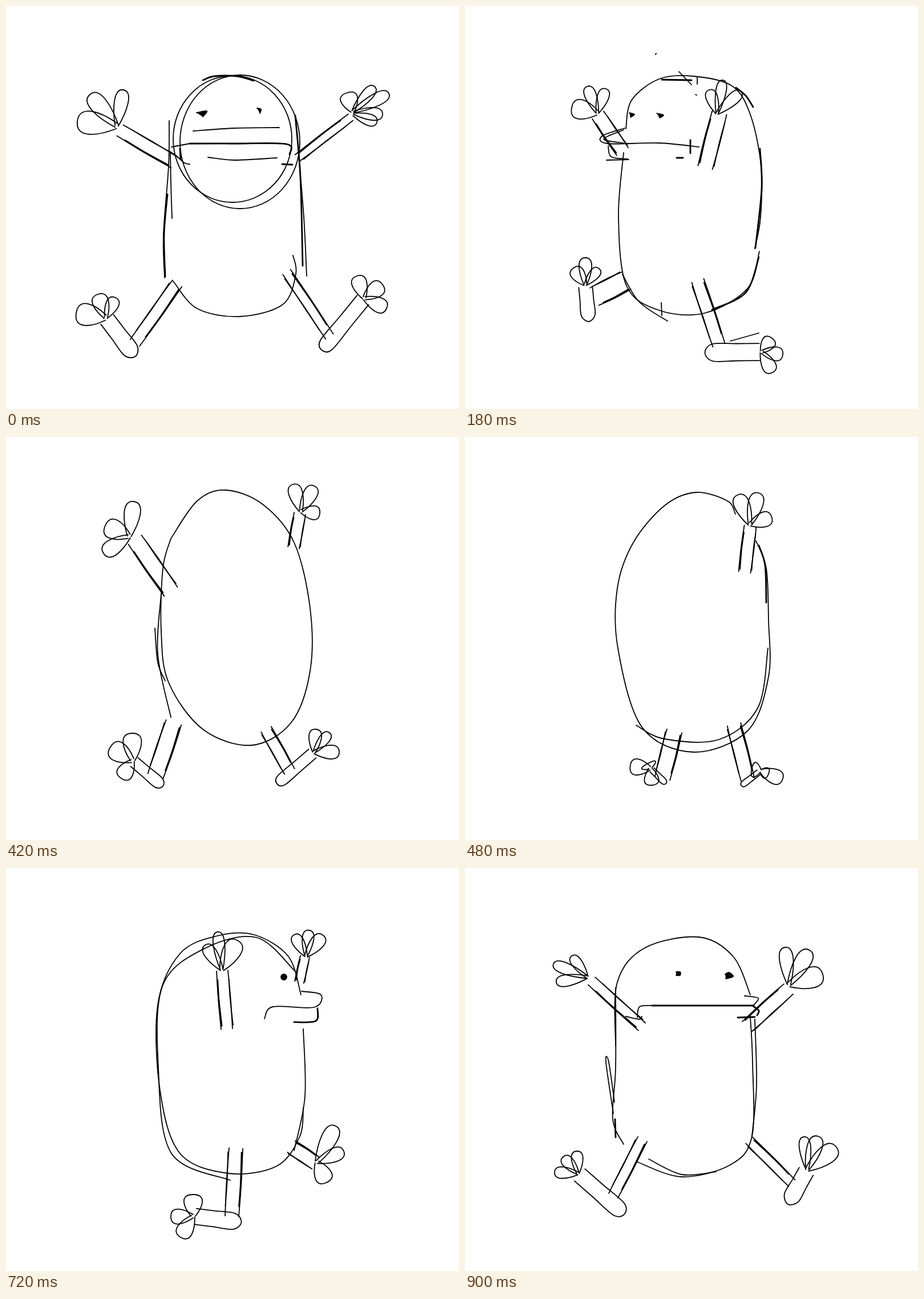
An HTML page with a canvas that plays this animation: 794x706 px, repeating every 0.96 s.

```html
<!DOCTYPE html>
<html lang="en">
<head>
<meta charset="utf-8">
<title>Turning doodle</title>
<style>
html, body { margin: 0; width: 100%; height: 100%; overflow: hidden; background: #fff; }
canvas { display: block; }
</style>
</head>
<body>
<canvas id="stage" width="794" height="706"></canvas>
<script>
const ctx = document.getElementById('stage').getContext('2d');
ctx.lineCap = ctx.lineJoin = 'round';

function pen(kind) {
  ctx.lineWidth = kind === '*' ? 2.8 : 1.8;
  if (kind === '#') ctx.fill();
  ctx.stroke();
}

function smooth(pts) {
  ctx.beginPath();
  ctx.moveTo(...pts[0]);
  for (let i = 0; i < pts.length - 1; i++) {
    const b = pts[i], c = pts[i + 1], a = pts[i - 1] || b, d = pts[i + 2] || c;
    ctx.bezierCurveTo(b[0] + (c[0] - a[0]) / 6, b[1] + (c[1] - a[1]) / 6,
      c[0] - (d[0] - b[0]) / 6, c[1] - (d[1] - b[1]) / 6, c[0], c[1]);
  }
}

// A stroke runs through its points; prefix * is heavy, # is filled.
function stroke(text) {
  const kind = '*#'.includes(text[0]) ? text[0] : '';
  smooth(text.slice(kind.length).split(' ').map(p => p.split(',').map(Number)));
  pen(kind);
}

function ring(x, y, rx, ry) {
  ctx.beginPath();
  ctx.ellipse(x, y, rx, ry, 0, 0, 2 * Math.PI);
  pen();
}

// Gives points by distance along and beside the line from a to b.
function rail(ax, ay, bx, by) {
  const len = Math.hypot(bx - ax, by - ay) || 1;
  const ux = (bx - ax) / len, uy = (by - ay) / len;
  return { len, at: (along, side) => [ax + ux * along - uy * side, ay + uy * along + ux * side] };
}

function digit(x, y, tx, ty, w) {
  const { len, at } = rail(x, y, tx, ty);
  const tip = at(len, 0);
  ctx.beginPath();
  ctx.moveTo(...at(0, -w * 0.12));
  ctx.bezierCurveTo(...at(len * 0.4, -w * 0.5), ...at(len, -w * 0.8), ...tip);
  ctx.bezierCurveTo(...at(len, w * 0.8), ...at(len * 0.4, w * 0.5), ...at(0, w * 0.12));
  pen();
}

function sole(x, y, hx, hy, w) {
  const { len, at } = rail(x, y, hx, hy), r = w / 2;
  smooth([at(4, -r), at(len * 0.5, -r), at(len, -r), at(len + r * 0.9, 0), at(len, r), at(len * 0.5, r), at(4, r)]);
  pen();
}

// Two sketchy edges, each a thin line with a heavier second pass.
function bone(ax, ay, bx, by, w) {
  const { len, at } = rail(ax, ay, bx, by);
  for (const side of [-w / 2, w / 2]) {
    smooth([at(0, side), at(len * 0.5, side * 1.08), at(len, side)]);
    pen();
    smooth([at(len * 0.06, side + 1.5), at(len * 0.5, side), at(len * 0.85, side + 0.5)]);
    pen(side < 0 ? '*' : '');
  }
}

// bone: root, joint, width; base: where the digits meet; digits: tip and width each; heel: end and width
function limb(bone, base, digits, heel = [bone[2], bone[3], 0]) {
  return [...bone, ...base, ...heel, ...digits.flat()];
}

function drawLimb(n) {
  const [x, y] = n.slice(5, 7);
  bone(...n.slice(0, 5));
  if (n[9] > 8) sole(x, y, ...n.slice(7, 10));
  for (let i = 10; i < n.length; i += 3) digit(x, y, ...n.slice(i, i + 3));
}

const front = {
  body() {
    ring(410, 238, 105, 117);
    ring(397, 233, 104, 111);
    stroke('*345,130 365,123 405,123 434,131');
    stroke('286,201 285,280 276,400 278,476');
    stroke('*283,330 277,400 279,474');
    stroke('288,255 289,310 291,372');
    stroke('*507,192 516,300 520,455');
    stroke('512,250 522,370 527,473');
    stroke('293,482 335,530 410,544 485,523 508,470 503,437');
  },
  faceX: 400,
  face() {
    stroke('#334,187 352,184 345,194');
    stroke('#440,179 447,181 445,188');
    stroke('328,219 400,214 479,213');
    stroke('*322,241 400,241 492,242 497,260');
    stroke('290,247 322,241');
    stroke('*305,250 306,268');
    stroke('298,262 313,275 322,277');
    stroke('354,265 400,270 475,266');
    stroke('*484,277 502,278');
  },
  marks() {
    digit(609, 187, 660, 190, 22);
    digit(609, 190, 650, 204, 20);
  },
  armL: limb([295, 274, 200, 218, 22], [194, 210], [[125, 202, 40], [147, 155, 30], [206, 147, 24]]),
  armR: limb([511, 266, 604, 195, 14], [608, 185], [[598, 152, 30], [646, 141, 20], [671, 153, 22]]),
  legL: limb([300, 486, 226, 590, 20], [175, 546], [[123, 538, 38], [161, 505, 28], [192, 511, 22]], [219, 604, 28]),
  legR: limb([492, 466, 567, 579, 16], [628, 512], [[615, 473, 26], [660, 488, 28], [667, 530, 26]], [561, 594, 26])
};

const left34 = {
  body() {
    stroke('282,215 292,165 340,128 400,123 468,140 500,190 519,280 518,370 508,425');
    stroke('*475,143 492,157 505,177');
    stroke('*517,250 520,320 509,424');
    stroke('278,257 269,370 283,490 340,533 420,538 495,495 516,430');
    stroke('*515,440 492,502 433,532');
    stroke('276,470 305,518 355,552');
    stroke('*345,129 397,130');
  },
  faceX: 320,
  face() {
    stroke('#288,187 297,190 290,195');
    stroke('#336,188 348,191 341,196');
    stroke('280,214 240,228 250,241 340,240 410,247');
    stroke('*395,235 395,258');
    stroke('*371,266 382,266');
    stroke('278,217 243,233 277,240');
    stroke('251,245 256,264 285,268');
    stroke('248,270 287,269');
  },
  marks() {
    stroke('375,115 397,138');
    stroke('407,124 407,137');
    stroke('344,520 345,542');
    stroke('465,587 515,573');
    stroke('404,155 406,156');
    stroke('334,85 335,83');
  },
  armL: limb([276, 255, 233, 191, 24], [232, 187], [[187, 178, 34], [214, 141, 20], [247, 145, 20]]),
  armR: limb([421, 283, 446, 187, 26], [442, 188], [[428, 147, 20], [452, 130, 18], [484, 150, 20]]),
  legL: limb([283, 481, 227, 509, 34], [211, 488], [[190, 459, 24], [211, 441, 22], [235, 460, 18]], [216, 542, 24]),
  legR: limb([408, 481, 445, 594, 22], [520, 606], [[538, 582, 24], [557, 611, 24], [539, 642, 24]], [434, 607, 30])
};

const left = {
  body() {
    stroke('272,345 282,210 315,122 380,107 465,130 515,220 526,350 516,445 465,520 375,543 285,488 263,420 267,335');
    stroke('270,340 285,455 340,520 409,539');
    stroke('*306,145 278,250 275,360');
    stroke('*294,170 276,290 284,347');
  },
  faceX: 265,
  face() {
    stroke('278,208 243,217 244,237 300,243 316,258');
    stroke('246,241 256,257 275,257');
    stroke('*268,244 305,243');
  },
  armL: limb([303, 162, 306, 122, 20], [302, 120], [[288, 83, 32], [322, 84, 26]]),
  armR: limb([374, 278, 373, 170, 24], [368, 168], [[334, 123, 36], [371, 90, 28], [396, 123, 28]]),
  legR: limb([357, 490, 356, 602, 30], [354, 622], [[331, 659, 20], [358, 664, 24], [393, 646, 20]])
};

const back = {
  body() {
    stroke('289,178 335,112 385,93 450,118 505,185 533,300 533,410 500,500 430,540 345,512 285,430 272,340 275,230 289,178');
    stroke('272,275 266,380 289,491');
    stroke('261,335 266,395 279,427');
  },
  armL: limb([504, 194, 515, 134, 20], [517, 130], [[503, 83, 24], [541, 86, 24], [550, 134, 24]]),
  armR: limb([289, 271, 226, 180, 28], [216, 174], [[174, 155, 34], [224, 113, 28], [171, 204, 28]]),
  legL: limb([456, 512, 497, 586, 20], [540, 552], [[543, 512, 22], [567, 518, 18], [584, 552, 24]], [482, 602, 20]),
  legR: limb([294, 500, 262, 594, 28], [222, 567], [[183, 543, 34], [221, 519, 32], [202, 598, 28]], [268, 606, 20])
};

const backRight = {
  body() {
    stroke('474,135 460,112 405,97 350,120 295,185 267,265 268,370 310,508 400,552 495,515 532,420 532,320 528,230 510,182');
    stroke('300,505 350,529 445,530 513,475 531,370');
    stroke('*515,190 526,225 528,290');
  },
  marks() {
    stroke('532,466 529,481');
    stroke('*497,184 515,179');
  },
  armL: limb([476, 280, 485, 178, 22], [482, 176], [[453, 120, 30], [488, 110, 28], [525, 146, 28]]),
  legL: limb([487, 495, 494, 614, 28], [496, 618], [[462, 652, 30], [497, 663, 20], [529, 648, 28]]),
  legR: limb([440, 530, 430, 602, 26], [428, 594], [[396, 611, 22], [420, 625, 22], [454, 622, 22]])
};

const right = {
  body() {
    stroke('517,222 495,155 435,117 370,119 305,150 266,240 270,390 305,500 390,535 475,522 515,470 521,420');
    stroke('506,180 440,122 350,140 275,205 267,350 290,500 393,547');
    stroke('521,282 524,400 505,495');
  },
  faceX: 510,
  face() {
    ctx.beginPath();
    ctx.arc(487, 191, 5, 0, 7);
    pen('#');
    stroke('453,264 468,243 540,244 552,222 518,216');
    stroke('*505,270 543,268 546,246');
  },
  armL: limb([387, 282, 379, 180, 20], [378, 178], [[349, 135, 22], [371, 112, 20], [406, 127, 32]]),
  armR: limb([514, 200, 524, 155, 16], [526, 154], [[505, 117, 20], [531, 109, 20], [556, 118, 24]]),
  legL: limb([403, 491, 396, 610, 24], [328, 610], [[328, 572, 32], [289, 611, 26], [306, 647, 28]], [400, 619, 28]),
  legR: limb([500, 488, 543, 517, 24], [545, 515], [[578, 452, 28], [592, 496, 24], [562, 551, 30]])
};

const frontRight = {
  body() {
    stroke('264,312 267,200 315,140 410,121 470,155 500,222');
    stroke('264,210 264,350 259,440 278,484');
    stroke('260,430 247,340 252,340 262,410');
    stroke('*263,440 264,472');
    stroke('302,515 380,541 465,520 503,470 504,340 500,260');
    stroke('322,510 380,537 440,532');
    stroke('508,265 511,380 503,470');
  },
  faceX: 405,
  face() {
    stroke('#370,182 377,182 377,188 370,188');
    stroke('#456,186 463,183 470,190 457,194');
    stroke('302,262 306,243 330,241');
    stroke('*328,241 506,241');
    stroke('490,224 514,228 505,241');
    stroke('*505,242 515,250 512,258');
    stroke('282,260 305,265 310,260');
    stroke('*478,262 508,261');
  },
  armL: limb([310, 278, 222, 198, 18], [214, 191], [[155, 168, 20], [187, 154, 18], [160, 200, 20]]),
  armR: limb([494, 278, 567, 212, 24], [568, 204], [[561, 139, 24], [604, 144, 28], [627, 186, 36]]),
  legL: limb([311, 475, 260, 574, 18], [198, 535], [[157, 533, 20], [172, 506, 20], [196, 496, 20]], [270, 598, 28]),
  legR: limb([498, 477, 573, 552, 16], [600, 528], [[594, 471, 20], [619, 470, 26], [651, 489, 32]], [572, 578, 28])
};

const STEP = 60;
const SLOTS = 16;
const LIMBS = ['armL', 'armR', 'legL', 'legR'];
const keys = [[0, front], [3, left34], [5, left], [7, back], [10, backRight], [12, right], [15, frontRight]];

function draw(slot) {
  const i = keys.findLastIndex(key => key[0] <= slot);
  const [s, from] = keys[i], [e, to] = keys[(i + 1) % keys.length];
  const k = slot === s ? 0 : (slot - s) / (e - s);
  const near = k < 0.5 ? from : to;
  const mix = (a, b) => a + (b - a) * k;

  ctx.fillStyle = '#fff';
  ctx.fillRect(0, 0, 794, 706);
  ctx.fillStyle = ctx.strokeStyle = '#000';
  near.body();
  if (near.face) {
    ctx.save();
    if (from.face && to.face) ctx.translate(mix(from.faceX, to.faceX) - near.faceX, 0);
    near.face();
    ctx.restore();
  }
  for (const name of LIMBS) {
    const limb = near[name], a = from[name], b = to[name];
    if (limb) drawLimb(limb.map((v, n) => a?.[n] != null && b?.[n] != null ? mix(a[n], b[n]) : v));
  }
  if (!k) near.marks?.();
}

let start, shown = -1;
function tick(now) {
  start ??= now;
  let slot = Math.floor((now - start) / STEP) % SLOTS;
  if (slot === 8 || slot === 9) slot = 8.5; // one pose held for two steps
  if (slot !== shown) draw(shown = slot);
  requestAnimationFrame(tick);
}
draw(0);
requestAnimationFrame(tick);
</script>
</body>
</html>
```
